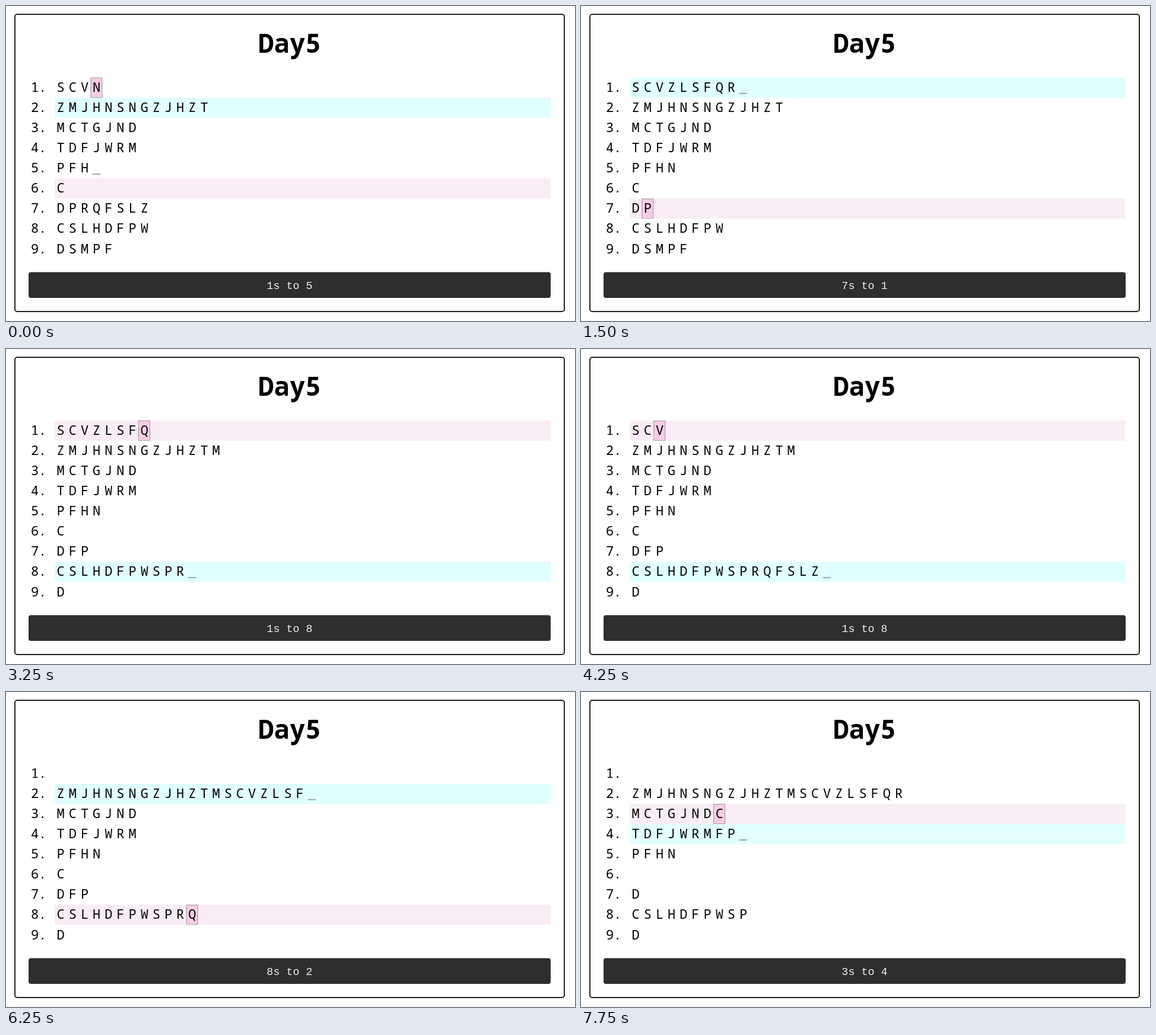
An HTML page that plays this animation: 959x532 px, repeating every 8 s.

```html
<!DOCTYPE html>
<html lang="en">
<head>
<meta charset="utf-8">
<title>Day5</title>
<style>
  html, body { margin: 0; width: 100%; height: 100%; overflow: hidden; background: #fff; }
  svg { display: block; }
  text { font: 22px "Noto Sans Mono", monospace; text-anchor: middle; }
  .title { font-size: 44px; font-weight: bold; }
  .caption { font: 18.4px "Liberation Mono", monospace; fill: #eee; }
  .border { fill: none; stroke: #222; stroke-width: 2; }
  .box { fill: #f8cce5; stroke: #999; }
</style>
</head>
<body>
<svg width="959" height="532" viewBox="0 0 959 532">
  <rect class="border" x="15" y="14" width="926" height="502" rx="4"/>
  <text class="title" x="478" y="78.5">Day5</text>
  <g id="rows"></g>
  <rect x="38" y="449.5" width="880" height="43.5" rx="4" fill="#2e2e2e"/>
  <text class="caption" id="caption" x="478" y="477.5"></text>
</svg>
<script>
const LOOP = 8000, STEP = 250, TICK = 207;
const LAG = 100, FADE = 450;
const LEFT = 82, TOP = 120.8, ROW = 34.07, CELL = 20.15;
const PINK = [250, 236, 245], CYAN = [224, 255, 255];
const START = ['SCVN', 'ZMJHNSNGZJHZT', 'MCTGJND', 'TDFJWRM', 'PFH', 'C', 'DPRQFSLZ', 'CSLHDFPW', 'DSMPF'];
const BEFORE = [6, 2];

// [from, to, count], expanded to one crate per tick
const moves = [
  [1, 5, 1], [7, 1, 7], [9, 7, 1], [9, 1, 1], [9, 2, 1], [9, 8, 1], [1, 7, 1],
  [1, 8, 10], [8, 2, 9], [6, 3, 1], [7, 3, 2], [3, 4, 3]
].flatMap(([from, to, count]) => Array(count).fill([from, to]));

const rows = document.getElementById('rows');
const caption = document.getElementById('caption');
const moveAt = tick => tick < 0 ? BEFORE : moves[Math.min(tick, moves.length - 1)];

function stacksAt(tick) {
  const stacks = START.map(s => [...s]);
  for (const [from, to] of moves.slice(0, tick)) stacks[to - 1].push(stacks[from - 1].pop());
  return stacks;
}

// Share of the fade window in which a row gave (side 0) or took (side 1) crates
function share(row, side, time) {
  const end = (time - LAG) / TICK, begin = end - FADE / TICK;
  let sum = 0;
  for (let k = Math.floor(begin); k < end; k++) {
    if (moveAt(k)[side] === row) sum += Math.min(end, k + 1) - Math.max(begin, k);
  }
  return sum / (end - begin);
}

function rowColor(row, time) {
  const pink = share(row, 0, time), cyan = share(row, 1, time);
  return `rgb(${PINK.map((p, i) => Math.round(255 + (p - 255) * pink + (CYAN[i] - 255) * cyan))})`;
}

function drawRow(stack, i, time, [from, to]) {
  const row = i + 1, y = TOP + ROW * i, base = y + 24.2;
  const cell = k => LEFT + CELL * k;
  let out = `<rect x="${LEFT}" y="${y}" width="836" height="${ROW}" fill="${rowColor(row, time)}"/>`;
  out += `<text x="48.5 61.7" y="${base}">${row}.</text>`;
  if (row === from) {
    out += `<rect class="box" x="${cell(stack.length - 1) + .5}" y="${y + .5}" width="19" height="33.2"/>`;
  }
  if (row === to) {
    out += `<rect x="${cell(stack.length) + 3.5}" y="${y + 26}" width="13.2" height="1.7" fill="#999"/>`;
  }
  const xs = stack.map((_, k) => (cell(k) + 10.2).toFixed(2)).join(' ');
  return out + `<text x="${xs}" y="${base}">${stack.join('')}</text>`;
}

let shown = -1;
function draw() {
  const time = Math.floor(performance.now() % LOOP / STEP) * STEP;
  if (time !== shown) {
    shown = time;
    const tick = Math.floor(time / TICK), move = moveAt(tick);
    rows.innerHTML = stacksAt(tick).map((stack, i) => drawRow(stack, i, time, move)).join('');
    caption.textContent = `${move[0]}s to ${move[1]}`;
  }
  requestAnimationFrame(draw);
}
draw();
</script>
</body>
</html>
```
